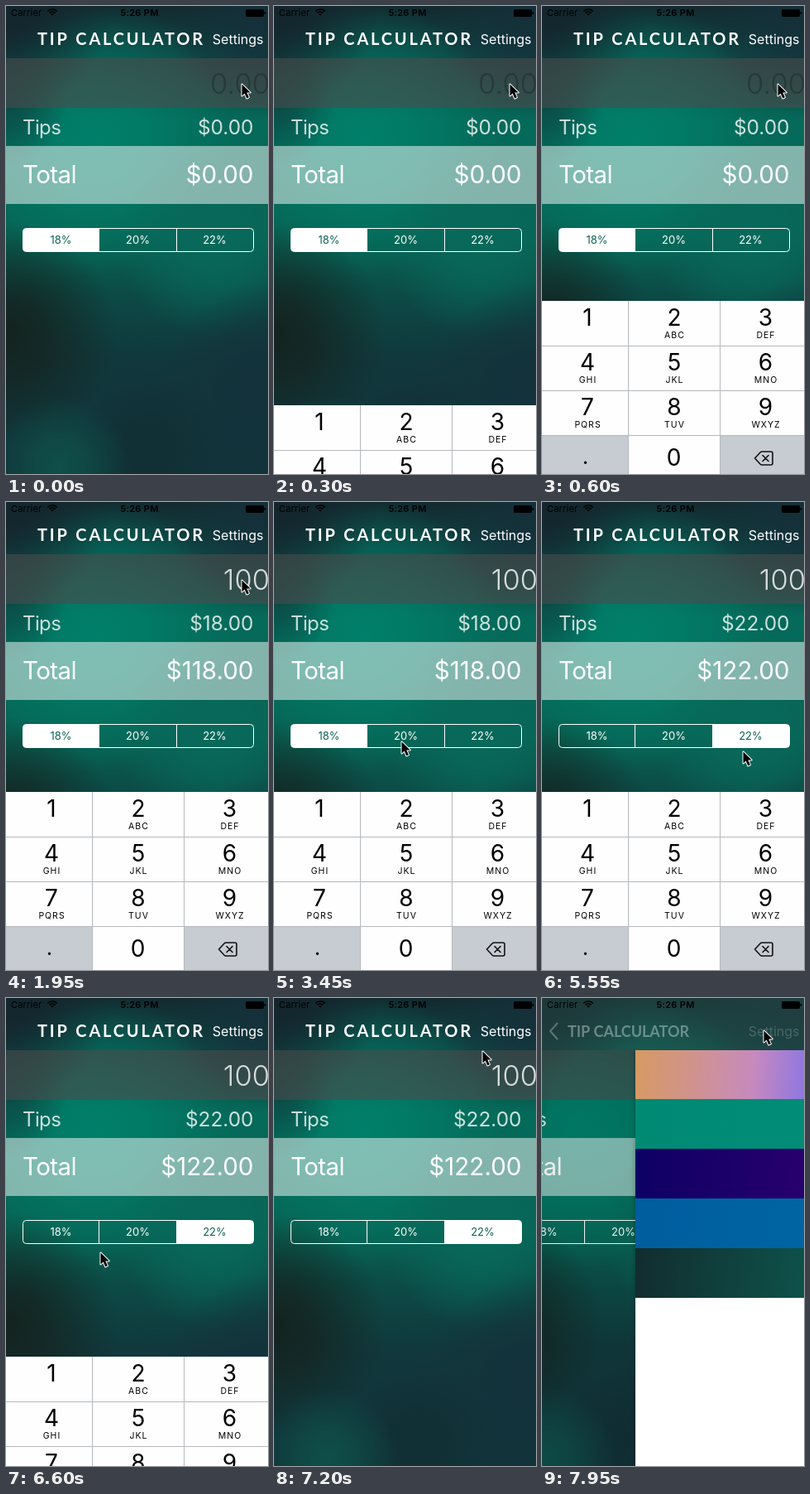
Write an HTML page with a canvas that moves like this. It is 317 px wide and 565 px high and loops after 8 s.

```html
<!DOCTYPE html>
<html lang="en">
<head>
<meta charset="utf-8">
<title>Tip calculator</title>
<style>
html, body { margin: 0; width: 100%; height: 100%; overflow: hidden; background: #11343c; }
canvas { display: block; width: 100vw; height: 100vh; }
</style>
</head>
<body>
<canvas id="stage" width="317" height="565"></canvas>
<script>
const W = 317, H = 565, NAV = 63, LOOP = 8000, STEP = 150;
const stage = document.getElementById('stage');
const ctx = stage.getContext('2d');

// Pointer path: [time, x, y], each position held until the next
const POINTER = [
  [0, 285, 94],
  [2850, 279, 112], [3000, 240, 200], [3150, 190, 286], [3300, 163, 304], [3450, 154, 289],
  [4050, 190, 292], [4200, 258, 288], [4350, 298, 283], [4500, 262, 282], [4650, 250, 286],
  [5550, 243, 301], [5700, 217, 314], [5850, 174, 317], [6000, 138, 313], [6150, 120, 309], [6300, 114, 307],
  [6900, 150, 240], [7050, 210, 130], [7200, 252, 64], [7350, 264, 45], [7500, 268, 39]
];
const AMOUNTS = [[0, ''], [1350, '1'], [1650, '10'], [1950, '100']];
const RATES = [[0, 0], [3750, 1], [5100, 2]];
const PRESSES = [[0, -1], [3600, 1], [3750, -1], [4950, 2], [5100, -1]];
const PERCENTS = [18, 20, 22];

const at = (track, t) => track.filter(k => k[0] <= t).pop();

// Critically damped spring from 0 to 1
function spring(t, start) {
  const x = Math.max(0, t - start) * 0.014;
  return 1 - (1 + x) * Math.exp(-x);
}

function text(str, x, y, size, color, { align = 'left', weight = 400, family = 'Inter', spacing = 0 } = {}) {
  ctx.font = `${weight} ${size}px ${family}, sans-serif`;
  ctx.letterSpacing = spacing + 'px';
  ctx.textAlign = align;
  ctx.fillStyle = color;
  ctx.fillText(str, x, y);
}

function rect(c, x, y, w, h, color) {
  c.fillStyle = color;
  c.fillRect(x, y, w, h);
}

function gradient(c, x0, y0, x1, y1, stops) {
  const g = c.createLinearGradient(x0, y0, x1, y1);
  stops.forEach(([offset, color]) => g.addColorStop(offset, color));
  return g;
}

function makeBackdrop() {
  const canvas = document.createElement('canvas');
  canvas.width = W;
  canvas.height = H;
  const c = canvas.getContext('2d');
  rect(c, 0, 0, W, H, gradient(c, 0, 0, 0, H, [
    [0, '#13292f'], [0.1, '#0e4644'], [0.25, '#056a5a'], [0.5, '#076354'],
    [0.62, '#0c4a46'], [0.75, '#11383c'], [1, '#11333a']]));
  const blobs = [
    [110, 160, 165, '#007f69'], [250, 285, 115, '#08695a'], [0, 395, 135, '#14231f'],
    [310, 455, 120, '#14323c'], [175, 530, 90, '#112f35'], [65, 555, 85, '#0f4f49'],
    [0, 118, 75, '#0b4c47'], [0, 0, 130, '#14252d'], [317, 15, 120, '#15303a']
  ];
  for (const [x, y, r, color] of blobs) {
    const g = c.createRadialGradient(x, y, 0, x, y, r);
    g.addColorStop(0, color);
    g.addColorStop(0.35, color + 'c0');
    g.addColorStop(1, color + '00');
    rect(c, 0, 0, W, H, g);
  }
  return canvas;
}
const backdrop = makeBackdrop();

function drawSegments(selected, pressed) {
  const outline = new Path2D();
  outline.roundRect(20.5, 268.5, 279, 28, 4);
  ctx.save();
  ctx.clip(outline);
  PERCENTS.forEach((percent, i) => {
    const x = 20 + i * 93;
    if (i === selected) rect(ctx, x, 268, i < 2 ? 93 : 94, 29, '#fff');
    else if (i === pressed) rect(ctx, x, 268, 93, 29, 'rgba(255,255,255,.25)');
    text(percent + '%', x + 46.5, 287, 13, i === selected ? '#0b6354' : '#fff', { align: 'center' });
  });
  rect(ctx, 112, 268, 1, 29, '#fff');
  rect(ctx, 206, 268, 1, 29, '#fff');
  ctx.restore();
  ctx.strokeStyle = '#fff';
  ctx.lineWidth = 1;
  ctx.stroke(outline);
}

function drawCalculator(t) {
  const amount = at(AMOUNTS, t)[1];
  const selected = at(RATES, t)[1];
  const tip = amount * PERCENTS[selected] / 100;
  const money = n => '$' + n.toFixed(2);
  const soft = 'rgba(255,255,255,.8)';

  ctx.drawImage(backdrop, 0, 0);
  rect(ctx, 0, NAV, W, 60, 'rgba(76,76,76,.6)');
  rect(ctx, 0, 169, W, 70, 'rgba(255,255,255,.5)');
  text(amount || '0.00', 319, 106, 34.5, amount ? soft : 'rgba(30,45,45,.6)', { align: 'right', weight: 350 });
  text('Tips', 20, 155, 24, soft, { spacing: -0.6 });
  text(money(tip), 299.5, 155, 24.4, soft, { align: 'right' });
  text('Total', 20, 214, 29.5, '#fff', { spacing: -0.6 });
  text(money(+amount + tip), 299.5, 214, 29.6, '#fff', { align: 'right' });
  drawSegments(selected, at(PRESSES, t)[1]);
}

function drawBackspace(x, y) {
  ctx.strokeStyle = '#111';
  ctx.lineWidth = 1.6;
  ctx.lineJoin = ctx.lineCap = 'round';
  ctx.stroke(new Path2D(`M${x} ${y}l6.5-7q1-1 2-1h11q2 0 2 2v12q0 2-2 2h-11q-1 0-2-1z
    m9.5-3.5l7 7m0-7l-7 7`));
}

function drawKeyboard(top) {
  if (top >= H) return;
  const letters = ['', 'ABC', 'DEF', 'GHI', 'JKL', 'MNO', 'PQRS', 'TUV', 'WXYZ'];
  const columns = [55, 160, 270.5];
  rect(ctx, 0, top, W, 216, '#fefefe');
  rect(ctx, 0, top + 162, 104, 54, '#c7ccd2');
  rect(ctx, 216, top + 162, 101, 54, '#c7ccd2');
  for (let row = 1; row < 4; row++) rect(ctx, 0, top + row * 54, W, 1, '#b5b8bc');
  rect(ctx, 104, top, 1, 216, '#b5b8bc');
  rect(ctx, 215, top, 1, 216, '#b5b8bc');
  letters.forEach((label, i) => {
    const x = columns[i % 3], y = top + Math.floor(i / 3) * 54;
    text(i + 1, x, y + 30, 28, '#000', { align: 'center' });
    text(label, x + 0.5, y + 45, 10.5, '#000', { align: 'center', spacing: 1 });
  });
  text('0', 159.5, top + 199, 28, '#000', { align: 'center' });
  text('.', 52.5, top + 197, 26, '#000', { align: 'center' });
  drawBackspace(257.5, top + 190);
}

function drawSettings(x) {
  const row = (i, left, right) => rect(ctx, x, 62 + i * 60, W, 60,
    gradient(ctx, x, 0, x + W, 30, [[0, left], [1, right]]));
  ctx.save();
  ctx.shadowColor = 'rgba(0,0,0,.3)';
  ctx.shadowBlur = 6;
  rect(ctx, x, NAV, W, H, '#fff');
  ctx.restore();
  rect(ctx, x, 62, W, 60, gradient(ctx, x, 62, x + W, 92, [
    [0, '#d79a62'], [0.22, '#d0938c'], [0.45, '#c78abd'], [0.66, '#8d76e2'], [1, '#6a68e0']]));
  row(1, '#008a74', '#008d78');
  row(2, '#0b0063', '#340072');
  row(3, '#005c9e', '#0068a4');
  row(4, '#13272b', '#0c6155');
}

function drawStatusBar() {
  text('Carrier', 6, 12, 11, '#000', { spacing: 0.2 });
  text('5:26 PM', 161.5, 12, 11, '#000', { align: 'center', weight: 600, spacing: 0.3 });
  ctx.strokeStyle = '#000';
  ctx.lineWidth = 1.5;
  ctx.lineCap = 'butt';
  for (const r of [2, 5, 8]) {
    ctx.beginPath();
    ctx.arc(56, 12, r, -Math.PI * 0.76, -Math.PI * 0.24);
    ctx.stroke();
  }
  ctx.fillStyle = '#000';
  ctx.beginPath();
  ctx.roundRect(290, 4, 22, 9, 1.5);
  ctx.fill();
  rect(ctx, 312.5, 7, 1.5, 3, '#000');
}

function drawNavBar(t, push) {
  ctx.drawImage(backdrop, 0, 0, W, NAV, 0, 0, W, NAV);
  if (push) rect(ctx, 0, 0, W, NAV, `rgba(42,80,74,${push * 0.7})`);
  drawStatusBar();
  ctx.globalAlpha = 1 - push;
  text('TIP CALCULATOR', 38 - 11 * push, 46.5, 20 - 3 * push, '#fff',
    { weight: 700, family: 'Lato', spacing: 2.8 - 4.4 * push });
  ctx.globalAlpha = t >= 7800 ? 0.2 : 1;
  text('Settings', 311.5, 46, 16, '#fff', { align: 'right' });
  if (push) {
    ctx.globalAlpha = push * 0.45;
    ctx.strokeStyle = '#fff';
    ctx.lineWidth = 2;
    ctx.stroke(new Path2D('M19 30l-9 10 9 10'));
  }
  ctx.globalAlpha = 1;
}

function drawPointer(t) {
  const [, x, y] = at(POINTER, t);
  const arrow = new Path2D(`M${x + 0.5} ${y + 0.5}v14l3.2-3 2.6 6 2.6-1.2-2.6-5.8h4.4z`);
  ctx.lineJoin = 'round';
  ctx.strokeStyle = '#fff';
  ctx.lineWidth = 2;
  ctx.stroke(arrow);
  ctx.fillStyle = '#000';
  ctx.fill(arrow);
}

function draw(t) {
  const push = spring(t, 7793);
  const keyboard = spring(t, 205) - spring(t, 6505);
  ctx.save();
  ctx.translate(Math.round(-push * W * 0.3), 0);
  drawCalculator(t);
  ctx.restore();
  if (push) {
    rect(ctx, 0, 0, W, H, `rgba(0,0,0,${push * 0.1})`);
    drawSettings(Math.round(W * (1 - push)));
  }
  drawKeyboard(Math.round(H - 215 * keyboard));
  drawNavBar(t, push);
  drawPointer(t);
}

function tick() {
  const t = performance.now() % LOOP;
  draw(Math.floor(t / STEP) * STEP);
  requestAnimationFrame(tick);
}
tick();
</script>
</body>
</html>
```
